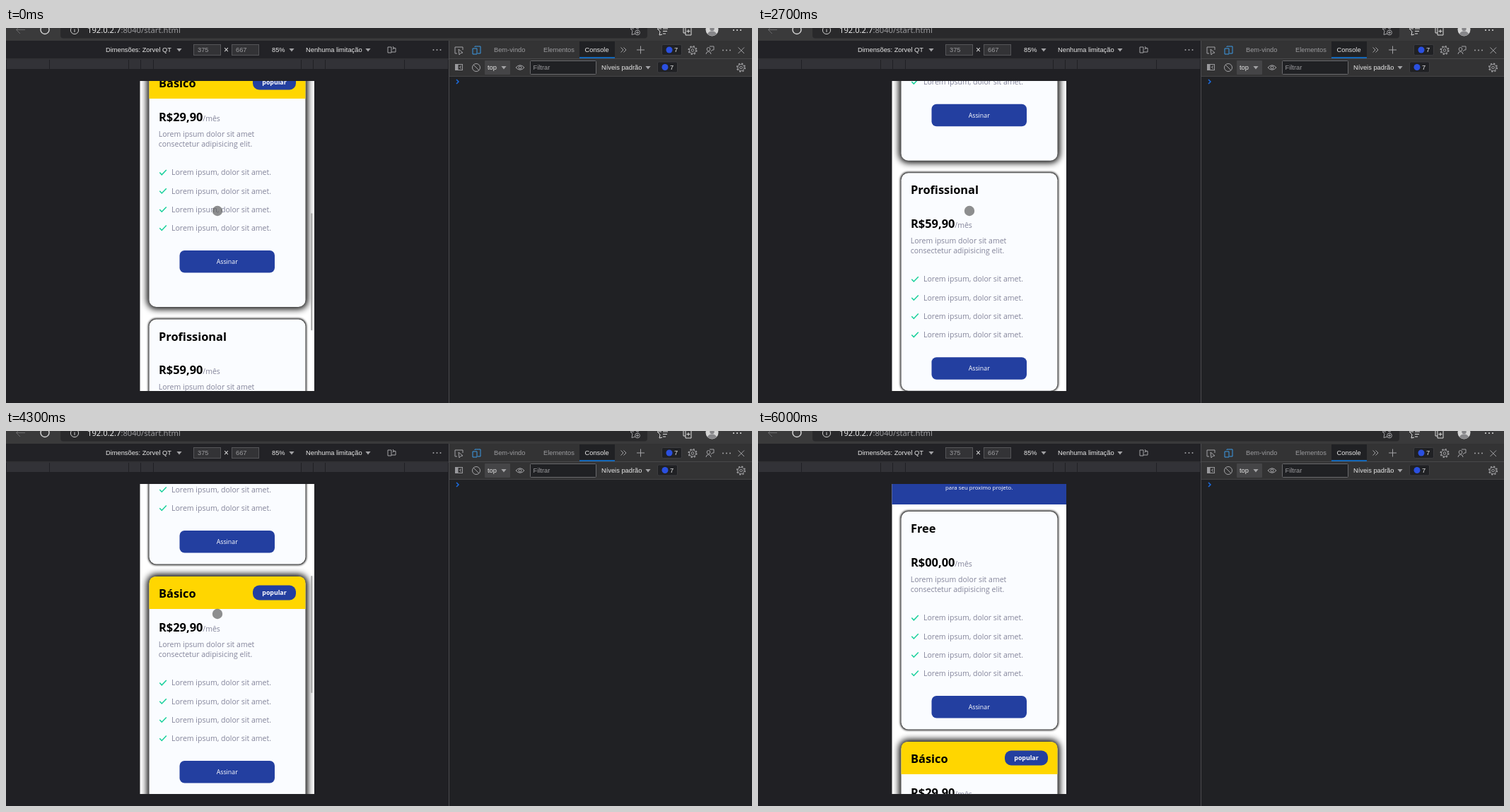
An HTML page that plays this animation: 1055x531 px, repeating every 6500 ms.

```html
<!DOCTYPE html>
<html lang="pt">
<head>
<meta charset="utf-8">
<style>
  html, body { margin: 0; width: 100%; height: 100%; overflow: hidden; background: #202024; }
  svg { display: block; }
  text { font: 9.3px "Liberation Sans", Arial, sans-serif; fill: #e8e8e8; white-space: pre; }
  .times { font-size: 12px; }
  .page text { font: 10.52px "Open Sans", sans-serif; fill: #83849a; }
  .page .big { font-size: 16.4px; font-weight: 700; fill: #000; }
  .page .label { font-size: 8.8px; fill: #fff; text-anchor: middle; }
  .page .strong { font-weight: 700; }
  .page .intro { font-size: 7.9px; fill: #fff; text-anchor: middle; }
  .url { font: 11.2px "Noto Sans", sans-serif; }
  .dim { fill: #9b9b9e; }
  .icon { fill: none; stroke: #a2a2a5; stroke-width: 1; }
</style>
</head>
<body>
<svg id="stage" width="1055" height="531" viewBox="0 0 1055 531"></svg>
<script>
const LOOP = 6500;
const stage = document.getElementById('stage');

const rect = (x, y, w, h, fill, extra = '') =>
  `<rect x="${x}" y="${y}" width="${w}" height="${h}" fill="${fill}" ${extra}/>`;
const text = (x, y, str, cls = '') => `<text x="${x}" y="${y}" class="${cls}">${str}</text>`;
const icon = (d, extra = '') => `<path class="icon" d="${d}" ${extra}/>`;
const ring = (x, y, r, extra = '') => `<circle class="icon" cx="${x}" cy="${y}" r="${r}" ${extra}/>`;
const dot = (x, y, r, fill) => `<circle cx="${x}" cy="${y}" r="${r}" fill="${fill}"/>`;
const arrow = (x, y) => `<path d="M${x - 3.6} ${y - 2}h7.2l-3.6 4.6z" fill="#a2a2a5"/>`;
const dots = (x, y, fill = '#a2a2a5') => [-5, 0, 5].map(d => dot(x + d, y, 1, fill)).join('');
const gear = (x, y) => ring(x, y, 1.8) + ring(x, y, 4.6) +
  ring(x, y, 5.8, 'style="stroke-dasharray:2.2 2.36;stroke-width:1.5"');
const badge = (x, y) => rect(x, y, 28, 15, '#202124', 'rx="2" stroke="#3d3d40"') +
  dot(x + 10.5, y + 7.5, 4.5, '#2b50e0') + text(x + 17.5, y + 10.5, '7');

function browserBar() {
  return rect(0, 0, 1055, 18, '#3a3a3b') +
    rect(77, -12, 830, 26.5, '#29292b', 'rx="4"') +
    icon('M27 2.5H14.5M20 -3L14.5 2.5L20 8', 'style="stroke:#69696b"') +
    '<rect id="hover" x="38" y="-16" width="34" height="32" rx="4" fill="#fff"/>' +
    icon('M59 -2A6 6 0 1 1 51 -2', 'style="stroke:#ddd;stroke-width:1.4"') +
    ring(97, 3, 5.6, 'style="stroke:#ccc"') + icon('M97 1.5V6', 'style="stroke:#ccc"') +
    text(115, 6.5, '192.0.2.7<tspan class="dim">:8040/start.html</tspan>', 'url') +
    icon('M890 8L885 9.5L886 4L883 1H888M890 -3L892 1H895') + ring(893, 6.5, 3.4) + icon('M891 6.5h4M893 4.5v4') +
    icon('M928 9L924 10L925 5L921 1H927M929 1H936M929 4.5H935M929 8H933', 'style="stroke:#ddd"') +
    icon('M958 -2V7H961M961 -1H969V10H961ZM965 2V7M962.5 4.5H967.5', 'style="stroke:#ddd"') +
    dot(998.5, 2.5, 9, '#d5d5d5') + dot(998.5, 1, 3.2, '#87878a') +
    '<path d="M992 9Q993 4.5 998.5 4.5T1005 9Q998.5 13 992 9Z" fill="#87878a"/>' +
    dots(1034, 3, '#ddd');
}

function deviceBar() {
  const field = (x, value) => rect(x + .5, 23.5, 38, 15, '#333336', 'stroke="#555558"') +
    text(x + 6, 34, value, 'dim');
  const marks = [0, 61, 173, 190, 208, 417, 434, 451, 563, 625];
  const ruler = marks.slice(1).map((end, i) =>
    rect(marks[i] + 1, 45, end - marks[i] - 1, 13, '#323237')).join('');
  return rect(0, 18, 626, 26, '#222226') + rect(0, 43.5, 626, 1, '#414145') + ruler +
    text(141, 34, 'Dimensões: Zorvel QT') + arrow(245, 31) +
    field(265, '375') + text(308, 35, '×', 'times') + field(319, '667') +
    text(376, 34, '85%') + arrow(404, 31) +
    text(424, 34, 'Nenhuma limitação') + arrow(512, 31) +
    icon('M545 35H540V27H545V35M547 28.5H551V34H545M547 26L549 28.5L547 30.5') + dots(609.5, 31);
}

function toolsPanel() {
  return rect(626, 18, 429, 513, '#202124') + rect(627, 18, 428, 50, '#333334') +
    rect(626, 18, 1, 513, '#4b4b4e') + rect(627, 43, 428, 1, '#48484a') + rect(627, 68, 428, 1, '#444446') +
    rect(811, 19, 50, 23, '#202124') + rect(811, 41, 50, 2, '#1467b8') +
    icon('M638 36H635V27H646V31M640 30L646 35L643 35.5L641 38Z') +
    icon('M663 27V26H671V36H667M660 29H666V37H660Z', 'style="stroke:#3d9be6"') +
    text(690, 34, 'Bem-vindo', 'dim') + text(760, 34, 'Elementos', 'dim') + text(818.5, 34, 'Console') +
    icon('M869.5 27.5L873 31L869.5 34.5M873.5 27.5L877 31L873.5 34.5') +
    icon('M892 31H903M897.5 25.5V36.5') + badge(927.5, 23.5) + gear(971, 31.5) +
    ring(993.5, 30, 2.4) + icon('M990 37Q990 33.5 993.5 33.5T997 37M995 26H1001V31H999L997 33') +
    dots(1019, 31.5) + icon('M1035.5 27.5L1044 36M1044 27.5L1035.5 36') +
    rect(635, 51, 11, 9, '#99999c') + rect(639.5, 52, 5.5, 7, '#333334') + icon('M644 53.5L641.5 55.5L644 57.5') +
    ring(665, 56, 5.5) + icon('M661 52L669 60') +
    rect(677, 46, 36, 20, '#454547', 'rx="1"') + text(681, 59, 'top') + arrow(704, 56) +
    icon('M721 56Q727 49.5 733 56Q727 62.5 721 56Z') + ring(727, 56, 2) +
    rect(741.5, 46.5, 93, 19, '#202124', 'stroke="#6a6a6d" rx="1"') + text(745.5, 59, 'Filtrar', 'dim') +
    text(842, 59, 'Níveis padrão') + arrow(908, 56) + badge(921.5, 48) + gear(1039.5, 56) +
    icon('M637 73L640 76L637 79', 'style="stroke:#1b6ce0;stroke-width:1.5"');
}

const shadow = (top, height, spread, filter) =>
  rect(202.5 - spread, top - spread, 221 + 2 * spread, height + 2 * spread, '#000',
    `rx="${10 + spread}" filter="url(#${filter})"`);

// Cards share one layout; the featured one is taller with a yellow band.
function card(top, title, price, featured) {
  const height = featured ? 341 : 308.5;
  const items = [0, 1, 2, 3].map(i => {
    const y = top + 154.3 + i * 26.2;
    return icon(`M217.3 ${y - 3.7}l3 3.2l6.5 -6.8`, 'style="stroke:#17d09b;stroke-width:1.5"') +
      text(234, y, 'Lorem ipsum, dolor sit amet.');
  }).join('');
  const band = featured
    ? `<path d="M202.5 ${top + 46}v-36q0 -10 10 -10h201q10 0 10 10v36z" fill="#ffd600"/>` +
      rect(349, top + 12.5, 61, 21, '#233fa0', 'rx="9"') + text(379.5, top + 26, 'popular', 'label strong')
    : '';
  return (featured ? shadow(top, height, 3, 'wide') : shadow(top, height, 1.2, 'thin')) +
    rect(202.5, top, 221, height, '#fafcff', 'rx="10"') + band +
    text(216, top + 30, title, 'big') +
    text(216, top + 77.5, price, 'big') + text(278.3, top + 77.5, '/mês') +
    text(215.7, top + 99.5, 'Lorem ipsum dolor sit amet') +
    text(215.7, top + 113.8, 'consectetur adipisicing elit.') + items +
    rect(245.5, top + 261, 134.5, 31.5, '#233fa0', 'rx="7"') +
    text(312.7, top + 280, 'Assinar', 'label');
}

const blur = (id, size) => `<filter id="${id}" x="-20%" y="-20%" width="140%" height="140%"
  color-interpolation-filters="sRGB"><feGaussianBlur stdDeviation="${size}"/></filter>`;

stage.innerHTML = `<defs>${blur('thin', 1.7)}${blur('wide', 5)}</defs>` +
  rect(0, 0, 1055, 531, '#202024') + deviceBar() + toolsPanel() + browserBar() +
  `<svg class="page" x="189.5" y="75" width="246.5" height="439" viewBox="189.5 75 246.5 439">
    ${rect(189, 75, 248, 440, '#fff')}
    <g id="content">
      ${rect(189, 0, 248, 104, '#233fa0')}
      ${text(312.7, 82.5, 'para seu proximo projeto.', 'intro')}
      ${card(114, 'Free', 'R$00,00')}
      ${card(440, 'Básico', 'R$29,90', true)}
      ${card(798.5, 'Profissional', 'R$59,90')}
    </g>
    <rect id="thumb" x="431.3" width="2" height="166" rx="1" fill="#a4a4a4"/>
    <circle id="touch" cx="299" cy="259" r="7.2" fill="#555" fill-opacity=".66"/>
  </svg>`;

// Each list holds [start ms, value]; values stay until the next entry.
const scrollSteps = [
  [0, 386], [600, 427.5], [1000, 510.5], [1100, 540], [1200, 551.5],
  [1700, 556], [1800, 568], [1900, 581], [2000, 590], [2100, 593.3],
  [3400, 550], [3500, 511], [3900, 428.5], [4000, 372], [4100, 346],
  [4300, 234], [4500, 181], [4700, 142], [4800, 128], [5000, 93], [5100, 16], [5300, 0]
];
const thumbSteps = [[0, 1], [2600, .5], [2700, 0], [3400, 1], [5900, .5], [6000, 0]];
const hoverSteps = [[0, 0], [5500, .07], [5600, .12], [5900, .05], [6000, 0]];
const valueAt = (steps, t) => steps.findLast(([start]) => start <= t)[1];

const [content, thumb, touch, hover] =
  ['content', 'thumb', 'touch', 'hover'].map(id => document.getElementById(id));

function draw() {
  const t = performance.now() % LOOP;
  const scroll = valueAt(scrollSteps, t);
  content.setAttribute('transform', `translate(0 ${-scroll})`);
  thumb.setAttribute('y', 117 + scroll * .3765);
  thumb.setAttribute('opacity', valueAt(thumbSteps, t));
  touch.setAttribute('opacity', t < 5500 ? 1 : 0);
  hover.setAttribute('opacity', valueAt(hoverSteps, t));
  requestAnimationFrame(draw);
}
draw();
</script>
</body>
</html>
```
